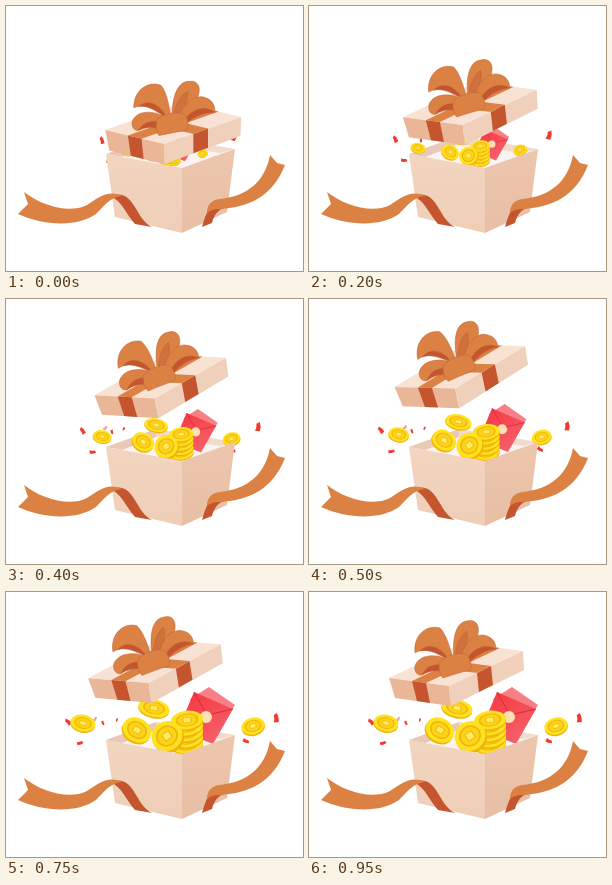
These frames come from a looping animation (297x265 px, 1 s). An HTML page:

```html
<!DOCTYPE html>
<html lang="en">
<head>
<meta charset="utf-8">
<title>Gift box</title>
<style>
html, body { margin: 0; height: 100%; overflow: hidden; background: #fff; }
svg { display: block; width: 100vw; height: 100vh; }
.light { fill: #dc8144; }
.mid { fill: #d0703c; }
.dark { fill: #c4552f; }
.bow path { stroke: #bf6335; stroke-width: .5; stroke-linejoin: round; }
</style>
</head>
<body>
<svg viewBox="0 0 297 265">
  <defs>
    <linearGradient id="left" x2="0" y2="1">
      <stop stop-color="#f2d5c0"/><stop offset="1" stop-color="#efceb6"/>
    </linearGradient>
    <linearGradient id="right" x2="0" y2="1">
      <stop stop-color="#ecc6ad"/><stop offset="1" stop-color="#e8bfa5"/>
    </linearGradient>
    <linearGradient id="red" x2=".6" y2="1">
      <stop stop-color="#f6353e"/><stop offset="1" stop-color="#f5606a"/>
    </linearGradient>
    <g id="coin">
      <circle cy="3" r="16" fill="#efb40c"/>
      <circle r="16" fill="#ffe21f"/>
      <circle r="10.5" fill="#fdd31a" stroke="#f0b40a" stroke-width="1.8"/>
      <path d="M-4 -4H4V4H-4Z" fill="#ffec60" stroke="#f0b40a"/>
    </g>
  </defs>

  <path fill="#f9f4f1" d="M100 148L150 130L229 143L176 162Z"/>
  <path fill="#e9c8b5" d="M100 148L150 130V138L116 151Z"/>
  <path fill="#f1dbce" d="M150 130L229 143L214 147L150 138Z"/>
  <g id="confetti"></g>
  <g id="loot">
    <path fill="#f77f86" d="M184 107L203 95L229 113L206 148Z"/>
    <path fill="url(#red)" d="M188 100L227 117L207 152L172 138Z"/>
    <path fill="none" stroke="#dc2a38" d="M188 100L201 123L227 117"/>
    <circle cx="200" cy="125" r="6" fill="#fbe0b4"/>
  </g>

  <path fill="url(#left)" d="M100 148L176 162V227L109 211Z"/>
  <path fill="url(#right)" d="M176 162L229 143L221 206L176 227Z"/>

  <path class="dark" d="M108 189C117 187 122 191 127 198C133 207 137 217 146 221L129 218C121 209 117 198 108 192Z"/>
  <path class="light" d="M18 186C36 200 63 208 81 199C92 192 102 183 116 190C104 191 97 201 90 208C70 222 36 219 12 208L22 198Z"/>
  <path class="dark" d="M222 193C208 193 202 200 196 221L206 217C208 209 212 203 221 201Z"/>
  <path class="light" d="M264 149L271 157L279 159C267 190 243 202 212 203C208 203 205 204 201 207C201 198 206 194 214 193C241 190 259 176 264 149Z"/>

  <g id="lid">
    <path fill="#f8e2d3" d="M80 86L154 51L214 59L140 94Z"/>
    <path class="light" d="M103 89L177 54L191 56L117 91ZM168 81L108 73L122 66L182 74Z"/>
    <path fill="#e9b698" d="M80 86L140 94L142 114L86 106Z"/>
    <path fill="#f0d0ba" d="M140 94L214 59L215 78L142 114Z"/>
    <path class="dark" d="M103 89L117 91L121 111L108 109ZM168 81L182 74L184 93L170 100Z"/>
    <g class="bow">
      <path class="light" d="M106 61C104 44 117 32 131 36C137 42 141 55 144 67C128 59 116 55 106 61Z"/>
      <path class="dark" d="M111 59C118 51 131 53 140 68C128 61 119 57 111 59Z"/>
      <path class="light" d="M145 65C143 46 147 30 158 29C166 27 171 32 169 42C165 52 156 60 150 67Z"/>
      <path class="mid" d="M146 65C147 52 152 43 158 39C160 48 156 58 150 67Z"/>
      <path class="light" d="M151 67C156 48 168 40 178 44C184 46 187 51 187 57C177 56 165 62 158 70Z"/>
      <path class="dark" d="M157 69C164 56 176 51 187 57C178 58 168 62 160 71Z"/>
      <path class="light" d="M140 68C124 60 109 64 106 74C105 79 108 84 113 83C120 76 130 75 138 76Z"/>
      <path class="dark" d="M113 83C117 74 126 71 136 73L132 79C124 78 118 80 113 83Z"/>
      <path class="light" d="M131 69C139 63 150 60 157 62C162 67 163 74 161 78C152 80 143 83 134 86C130 82 129 75 131 69Z"/>
    </g>
  </g>
</svg>
<script>
const $ = id => document.getElementById(id);
const put = (id, ...ops) => $(id).setAttribute('transform', ops.join(' '));

function coin(x, y, tilt, size, flat) {
  return `<use href="#coin" transform="translate(${x} ${y}) rotate(${tilt}) scale(${size} ${size * flat})"/>`;
}

// Low coins face the viewer, outer coins are smaller.
const stack = [0, 1, 2, 3, 4].map(i => coin(181, 152 - 6 * i, -6, 1, .58));
const loose = [[148, 116, 12], [131, 138, 30], [161, 144, -35], [77, 131, 10], [247, 134, -14]]
  .map(([x, y, tilt]) => coin(x, y, tilt, 1 - Math.abs(x - 155) / 350, .56 + (y - 116) ** 2 / 2100));
$('loot').innerHTML += stack.join('') + loose.join('');

const bits = [[62, 130], [270, 126], [89, 127], [74, 151], [240, 149], [97, 131], [111, 128]];

function confetti(spread) {
  return bits.map(([x, y], i) => {
    const px = 155 + (x - 155) * (.35 + .65 * spread), py = y + 8 * (1 - spread);
    const turn = 30 + 40 * i + 50 * (1 - spread), size = Math.abs(x - 155) / 100;
    return `<path fill="${i == 2 ? '#f0a0a4' : '#f03a30'}" d="M-4 -2Q0 -3 4 -1L3 3Q0 1 -3 1Z"
      transform="translate(${px} ${py}) rotate(${turn}) scale(${size})"/>`;
  }).join('');
}

function draw() {
  const t = Math.floor(performance.now() % 1000 / 50) * 50;
  const rise = Math.min(t / 520, 1), settle = Math.max(0, (t - 520) / 430);
  const x = 167.5 - 17.5 * rise - 3 * settle;
  const y = 116 - 52 * rise + 7 * settle;
  const tilt = 5.9 - 12.2 * rise * (1.5 - .5 * rise) + 6.3 * settle;
  const spread = Math.min(1, .44 + .0008 * t);

  put('lid', `translate(${x} ${y})`, `rotate(${tilt})`, 'translate(-147 -71)');
  put('loot', 'translate(157 158)', `scale(${spread})`, 'translate(-157 -158)');
  $('confetti').innerHTML = confetti(spread);
  requestAnimationFrame(draw);
}
draw();
</script>
</body>
</html>
```
